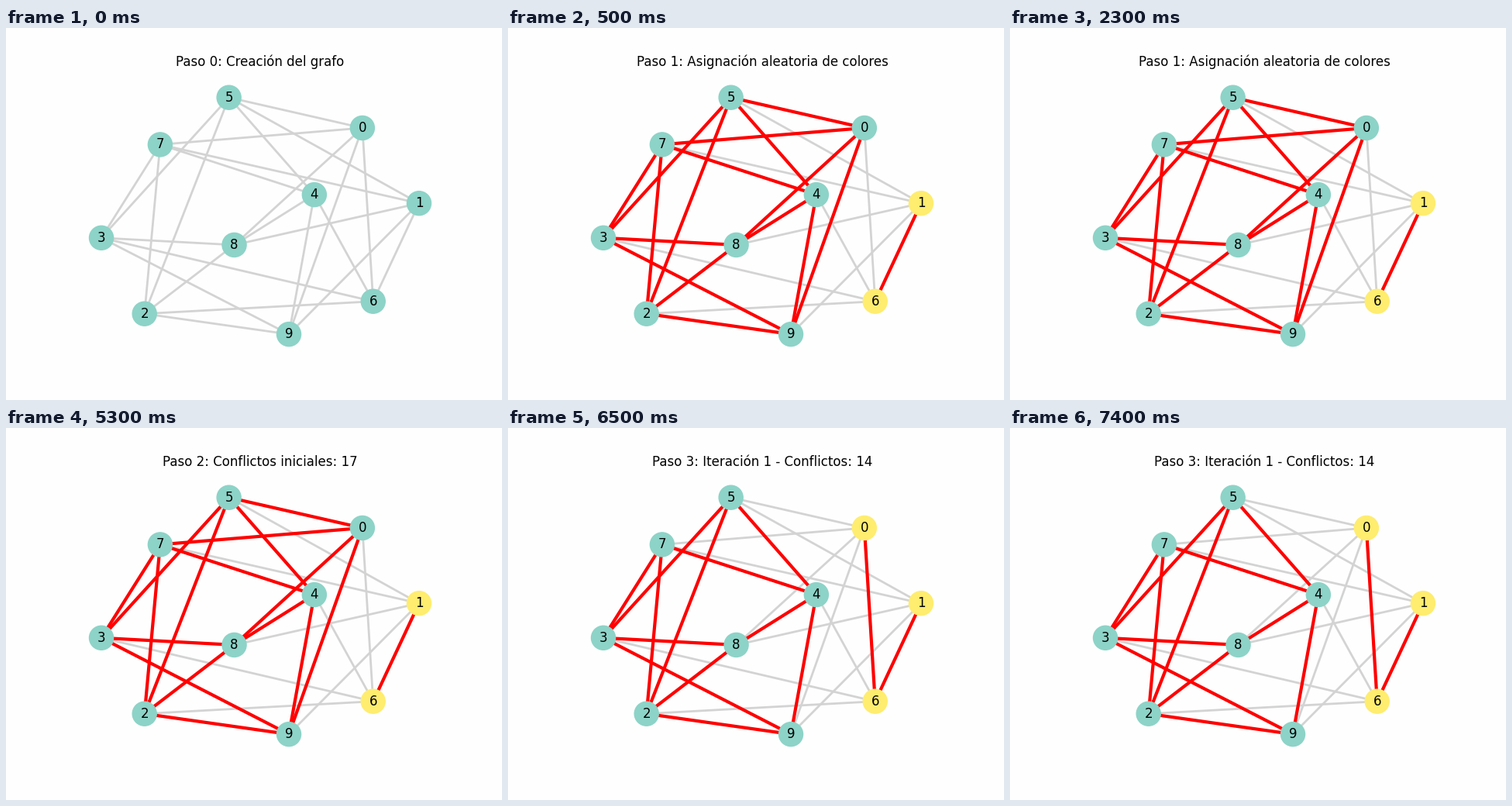
Write a matplotlib script that moves like this. It is 640 px wide and 480 px high and loops after 8 s.

```python
from itertools import product

import matplotlib.pyplot as plt
import numpy as np
from matplotlib.animation import FuncAnimation
from matplotlib.collections import LineCollection

TEAL, YELLOW = "#8dd3c7", "#ffed6f"
STEP_MS, LOOP_MS = 500, 8000
HALF = 5
COUNT = 2 * HALF

# Complete bipartite graph: every low node joins every high node
EDGES = list(product(range(HALF), range(HALF, COUNT)))


def spring_layout(seed=42, rounds=50):
    """Fruchterman-Reingold layout from seeded random positions."""
    pos = np.random.RandomState(seed).rand(COUNT, 2)
    links = np.zeros((COUNT, COUNT))
    for a, b in EDGES:
        links[a, b] = links[b, a] = 1
    k = np.sqrt(1 / COUNT)
    step = np.ptp(pos, axis=0).max() * 0.1
    cooling = step / (rounds + 1)
    for _ in range(rounds):
        delta = pos[:, None] - pos[None]
        dist = np.linalg.norm(delta, axis=-1).clip(0.01)
        force = np.einsum("ijk,ij->ik", delta,
                          k * k / dist**2 - links * dist / k)
        length = np.linalg.norm(force, axis=-1)
        length = np.where(length < 0.01, 0.1, length)
        pos += force * (step / length)[:, None]
        step -= cooling
    return pos


def conflicts(yellow):
    return [(a, b) for a, b in EDGES if (a in yellow) == (b in yellow)]


POS = spring_layout()
START, MOVED = {1, 6}, {0, 1, 6}
CLASH_START, CLASH_MOVED = conflicts(START), conflicts(MOVED)

# Start time in ms, title, yellow nodes, edges in conflict
STAGES = [
    (0, "Paso 0: Creación del grafo", set(), []),
    (500, "Paso 1: Asignación aleatoria de colores", START, CLASH_START),
    (3500, f"Paso 2: Conflictos iniciales: {len(CLASH_START)}",
     START, CLASH_START),
    (6500, f"Paso 3: Iteración 1 - Conflictos: {len(CLASH_MOVED)}",
     MOVED, CLASH_MOVED),
]


def segments(edges):
    return [POS[[a, b]] for a, b in edges]


plt.rcParams["font.family"] = "DejaVu Sans"
fig, ax = plt.subplots(figsize=(6.4, 4.8), dpi=100, facecolor="#fefefe")
fig.subplots_adjust(left=0.125, right=0.9, bottom=0.11, top=0.88)
low, high = POS.min(axis=0), POS.max(axis=0)
pad = 0.105 * (high - low)
(left, bottom), (right, top) = low - pad, high + pad
ax.set(xlim=(left, right), ylim=(bottom, top))
ax.axis("off")

title = ax.set_title("", fontsize=12)
gray = LineCollection(segments(EDGES), colors="lightgray", linewidths=2,
                      zorder=1)
red = LineCollection([], colors="red", linewidths=3, zorder=1.5)
for lines in (gray, red):
    ax.add_collection(lines, autolim=False)
nodes = ax.scatter(*POS.T, s=500, c=[TEAL] * COUNT, zorder=2)
for i, (x, y) in enumerate(POS):
    ax.text(x, y, str(i), fontsize=12, ha="center", va="center", zorder=3)


def draw(frame):
    now = frame * STEP_MS
    _, text, yellow, clashes = [s for s in STAGES if s[0] <= now][-1]
    title.set_text(text)
    red.set_segments(segments(clashes))
    nodes.set_color([YELLOW if i in yellow else TEAL for i in range(COUNT)])
    return title, red, nodes


anim = FuncAnimation(fig, draw, frames=LOOP_MS // STEP_MS, interval=STEP_MS,
                     init_func=lambda: draw(0), repeat=True, repeat_delay=0)
plt.show()
```
